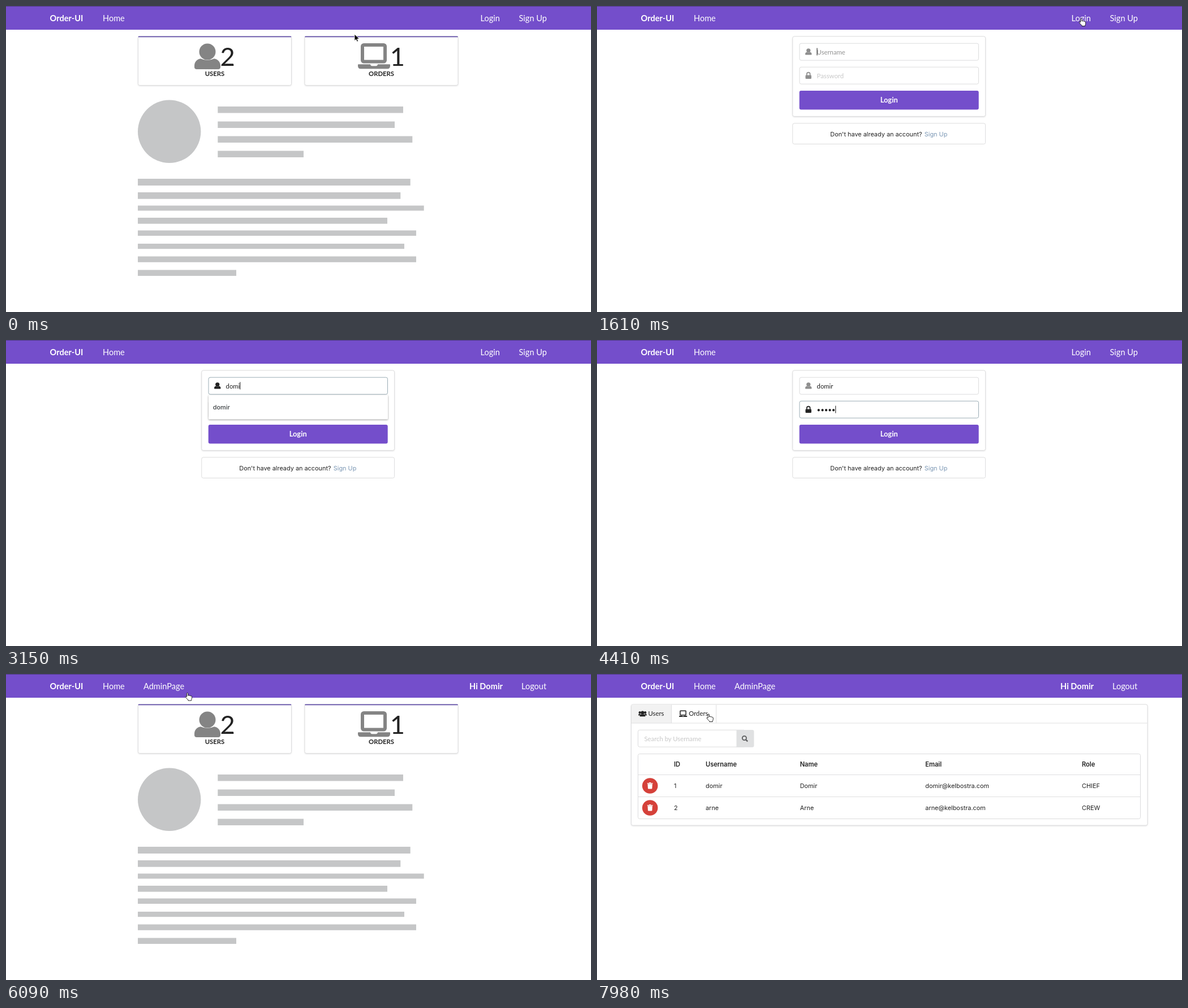
These frames come from a looping animation (1034x542 px, 8000 ms). An HTML page:

```html
<!DOCTYPE html>
<html lang="en">
<head>
<meta charset="utf-8">
<title>Order-UI</title>
<style>
html, body { margin: 0; width: 100%; height: 100%; overflow: hidden; background: #fff; }
svg { display: block; width: 1034px; height: 542px; }
text { font: 11.31px Lato, sans-serif; fill: #222; white-space: pre; }
.nav text { font-size: 14.56px; fill: #fff; }
.nav .bold, .bold { font-weight: 700; }
.sys, .sys text { font-family: Inter, sans-serif; font-size: 10.9px; }
.sys .head { font-weight: 600; font-size: 11.1px; }
.mid { text-anchor: middle; }
.num { font-size: 45.3px; text-anchor: middle; }
.box { fill: #fff; stroke: #dcdcdd; }
.line { stroke: #dfdfe0; }
.icon { fill: #848484; stroke: #848484; }
.dark { fill: #222; stroke: #222; }
.hint { fill: #c8c8c8; }
.card { filter: drop-shadow(0 1px 1px #2224261f); }
</style>
</head>
<body>
<svg viewBox="0 0 1034 542">
  <defs>
    <g id="person" stroke="none">
      <circle cx="23" cy="15" r="14.5"/>
      <path d="M0 42v-2C0 33 5 27.8 11 27.3q12 5.4 24 0c6 .5 11 5.7 11 12.7v2q0 4-4 4H4q-4 0-4-4z"/>
    </g>
    <g id="laptop">
      <rect x="8" y="3" width="40" height="29.5" rx="2.5" fill="none" stroke-width="6"/>
      <path stroke="none" d="M1 37.3H22q.5 3 3 3h7q2.500 0 3-3H56q1 0 1 1v2q0 5-5 5H5q-5 0-5-5v-2q0-1 1-1z"/>
    </g>
    <g id="lock">
      <rect y="5.400" width="10.400" height="6.600" rx="1.200" stroke="none"/>
      <path d="M2.300 6V3.600a2.900 2.900 0 0 1 5.800 0V6" fill="none" stroke-width="1.700"/>
    </g>
    <g id="bin">
      <circle r="13.800" fill="#d5413a"/>
      <path fill="#fff" d="M-4.800-5h3l.6-.9h2.400l.6.900h3v1.400h-9.600zM-4.200-2.900h8.400l-.5 7.300q-.1 1-1 1h-5.400q-.9 0-1-1z"/>
    </g>
    <g id="spinner" fill="none" stroke-width="2.400">
      <circle r="13" stroke="#e6e6e6"/>
      <circle class="arc" r="13" stroke="#767676" pathLength="4" stroke-dasharray="1 3"/>
    </g>
  </defs>

  <g class="nav">
    <rect width="1034" height="42" fill="#744ecb"/>
    <rect width="1034" height="1" fill="#4f3c86"/>
    <rect id="hover" y="1" height="41" fill="#fff"/>
    <text x="77.6" y="27.2" class="bold">Order-UI</text>
    <text x="171" y="27.2">Home</text>
    <g id="guest">
      <text x="838.500" y="27.2">Login</text>
      <text x="906.500" y="27.2">Sign Up</text>
    </g>
    <g id="member">
      <text x="243" y="27.2">AdminPage</text>
      <text x="878" y="27.2" class="bold" text-anchor="end">Hi Domir</text>
      <text x="911" y="27.2">Logout</text>
    </g>
  </g>

  <g id="home">
    <g class="card">
      <rect class="box" x="233.500" y="54" width="271" height="86.500" rx="3"/>
      <rect class="box" x="528" y="54" width="271" height="86.500" rx="3"/>
      <path d="M234.500 54.300h269M529 54.300h269" stroke="#6350a8" stroke-width="1.700" stroke-linecap="round"/>
    </g>
    <use href="#person" x="333" y="66" class="icon"/>
    <use href="#laptop" x="622" y="66" class="icon"/>
    <text id="people" x="391.700" y="106" class="num"></text>
    <text id="orders" x="692" y="106" class="num"></text>
    <text x="369" y="124.300" class="bold mid">USERS</text>
    <text x="663.500" y="124.300" class="bold mid">ORDERS</text>
    <g id="cardLoad">
      <rect x="-134" y="-41" width="268" height="82" fill="#fff" opacity=".8"/>
      <use href="#spinner" transform="scale(1.2)"/>
    </g>
    <g id="bars" fill="#c5c6c7"><circle cx="288.700" cy="222.300" r="55.700"/></g>
  </g>

  <g id="login">
    <g class="card"><rect class="box" x="345.800" y="53.900" width="340.800" height="141.700" rx="3"/></g>
    <g id="nameField">
      <rect class="box" x="358" y="66.200" width="316.500" height="30" rx="3"/>
      <use href="#person" transform="translate(368 75) scale(.25)" class="dark"/>
      <text x="388.600" y="85.700"></text>
      <path class="caret" d="M0 74.500v13" stroke="#111"/>
    </g>
    <g id="passField">
      <rect class="box" x="358" y="108.200" width="316.500" height="30" rx="3"/>
      <use href="#lock" x="368.500" y="117" class="dark"/>
      <text x="388.600" y="127.700"></text>
      <path class="caret" d="M0 116.500v13" stroke="#111"/>
    </g>
    <rect x="357.700" y="150" width="317" height="33.600" rx="3" fill="#744ecb"/>
    <text x="516.200" y="171.400" class="bold mid" style="font-size:12.9px;fill:#fff">Login</text>
    <rect class="box" x="345.800" y="207.800" width="340.800" height="36.700" rx="3"/>
    <g class="sys">
      <text x="412.300" y="230.600">Don't have already an account?</text>
      <text x="578.800" y="230.600" style="fill:#7b97b4">Sign Up</text>
    </g>
    <g id="suggest" class="sys">
      <rect x="358" y="97.500" width="317" height="43" rx="1.500" fill="#fff" style="filter:drop-shadow(0 1px 1.500px #0006)"/>
      <text x="365.800" y="122.800" style="font-weight:500;fill:#3c4043">domir</text>
    </g>
  </g>

  <g id="panel">
    <g class="card"><rect id="frame" class="box" x="60.500" y="53.900" width="912.500" rx="3"/></g>
    <path d="M61 87V57q0-2.600 2.600-2.600H131.500V87z" fill="#f2f2f2"/>
    <path class="line" d="M61 87H972.500M131.500 54.500V87M210.700 54.500V87"/>
    <g class="dark" stroke="none">
      <use href="#person" transform="translate(75.600 65.500) scale(.212)"/>
      <circle cx="75.700" cy="68.200" r="1.700"/>
      <circle cx="85.200" cy="68.200" r="1.700"/>
      <path stroke="none" d="M73.300 73.500v-1.600q0-1.400 1.400-1.400h2.200l-1.600 3zM87.700 73.500v-1.600q0-1.400-1.400-1.400h-2.200l1.600 3z"/>
    </g>
    <use href="#laptop" transform="translate(145 64.600) scale(.253)" class="dark"/>
    <text x="90.500" y="74.300">Users</text>
    <text x="162.300" y="74.300">Orders</text>
    <use id="panelLoad" href="#spinner" x="516.500" y="168.500"/>
    <g id="list">
      <rect class="box" x="72.500" y="99.200" width="190" height="30" rx="3"/>
      <path d="M246.500 99h28q3 0 3 3v24.700q0 3-3 3h-28z" fill="#e0e1e2"/>
      <g fill="none" stroke="#5c5d5e" stroke-width="1.800"><circle cx="260.400" cy="113.500" r="3.600"/><path d="M263 116.200l3.200 3.200" stroke-width="2.300"/></g>
      <text x="83.500" y="118.700" class="hint">Search by Username</text>
      <rect class="box" x="72.500" y="141.500" width="888" height="115" rx="3"/>
      <path class="line" d="M73 178.500H960M73 217.500H960"/>
      <use href="#bin" x="93.700" y="198"/>
      <use href="#bin" x="93.700" y="237"/>
      <g id="cells" class="sys"></g>
    </g>
  </g>

  <g id="cursor" stroke-linejoin="round">
    <path id="arrow" d="M0 0v11.500l2.700-2.400 1.800 4.100 2-.9-1.800-4 3.700-.2z" fill="#000" stroke="#fff" stroke-width=".8"/>
    <path id="hand" d="M0 1.300Q0 0 1.100 0t1.200 1.300V5q.4-1 1.500-.8.900.2 1 1 .3-.7 1.300-.5.900.2 1 1.100.4-.5 1.100-.3.900.3.900 1.300v2.600q0 1.500-1 2.900v1.300H2.500v-1.100Q.3 10.500-1.900 7.700q-.6-1 .2-1.500.800-.4 1.700.9z" fill="#fff" stroke="#111" stroke-width=".9"/>
  </g>
</svg>
<script>
const LOOP = 8000, $ = id => document.getElementById(id);
const clamp = v => Math.max(0, Math.min(1, v));
const fade = (t, from, span = 100) => clamp((t - from) / span);
const show = (id, on) => $(id).style.display = on ? '' : 'none';
const within = (t, a, b) => t >= a && t < b;

// Scene changes
const LOGIN = 1540, HOME = 5000, PEOPLE = 5150, ORDERS = 5310, PANEL = 6760, LIST = 6960;
// Key presses and focus changes
const FOCUS = 1600, NEXT = 3400, SUBMIT = 4480;
const nameKeys = [2590, 2730, 3010, 3150, 3290];
const passKeys = [3570, 3640, 3710, 3780, 4060];
// Pointer stops: time, x, y
const path = [[0, 616, 50], [840, 850, 24], [1000, 854.5, 22], [5460, 854.5, 22],
  [6080, 319.5, 33.5], [6400, 306, 26], [7150, 306, 26], [8000, 196, 71]];

const bars = [
  [374.3, 178, 11.5, 702], [374.3, 204.5, 11.5, 687], [374.3, 230.5, 11.5, 718.3], [374.3, 256.5, 11.5, 526],
  [233, 306, 12, 714.7], [233, 330, 11.7, 697.3], [233, 353.5, 9, 738.7], [233, 375, 10.7, 674],
  [233, 397.5, 9.5, 725], [233, 421, 9.2, 704], [233, 443.5, 10.3, 725], [233, 467.5, 10.5, 407]];
$('bars').innerHTML += bars.map(([x, y, h, end]) =>
  `<rect x="${x}" y="${y}" width="${end - x}" height="${h}"/>`).join('');

const columns = [136, 192, 358.7, 580.3, 857];
const rows = [
  ['ID', 'Username', 'Name', 'Email', 'Role'],
  ['1', 'domir', 'Domir', 'domir@kelbostra.com', 'CHIEF'],
  ['2', 'arne', 'Arne', 'arne@kelbostra.com', 'CREW']];
$('cells').innerHTML = rows.map((row, r) => row.map((cell, c) =>
  `<text x="${columns[c]}" y="${[164, 202, 241][r]}"${r ? '' : ' class="head"'}>${cell}</text>`).join('')).join('');

function drawField(id, t, value, hint, keys, start, end) {
  const [box, icon, text, caret] = $(id).children;
  const focused = within(t, start, end);
  const focus = focused ? fade(t, start + 10) : 0;
  const count = keys.filter(k => k <= t).length;
  const typed = value.slice(0, count);
  text.textContent = typed || hint;
  text.style.fill = typed ? '#222' : focused ? '#929292' : '#c8c8c8';
  icon.style.opacity = .5 + .5 * focus;
  box.style.stroke = `rgb(${220 - 65 * focus},${220 - 47 * focus},${221 - 40 * focus})`;
  const last = Math.max(start, ...keys.filter(k => k <= t));
  const x = 389 + (typed ? text.getComputedTextLength() : 0);
  caret.setAttribute('transform', `translate(${x})`);
  caret.style.display = focused && (t - last) % 1000 < 500 ? '' : 'none';
}

function pointer(t) {
  const i = path.findIndex(p => p[0] > t), a = path[i - 1], b = path[i];
  const u = (t - a[0]) / (b[0] - a[0]), e = u * u * (3 - 2 * u);
  return [a[1] + (b[1] - a[1]) * e, a[2] + (b[2] - a[2]) * e];
}

function drawPointer(t) {
  const [x, y] = pointer(t), member = t >= HOME;
  const items = member ? [[154, 332], [800, 972]] : [[154, 227], [822, 972]];
  const overNav = y < 42 && items.some(([a, b]) => within(x, a, b));
  const overTab = t >= PANEL && within(x, 61, 211) && within(y, 54, 87);
  show('cursor', t < nameKeys[0] || t >= 5460);
  show('hand', overNav || overTab);
  show('arrow', !overNav && !overTab);
  $('cursor').setAttribute('transform', `translate(${x} ${y})`);

  const hover = $('hover');
  hover.setAttribute('x', member ? 226.7 : 823);
  hover.setAttribute('width', member ? 105.3 : 67);
  const level = member ? (y < 42 || t < 7200 ? fade(t, 6090) : 0) : fade(t, 760) * (1 - fade(t, 1490));
  hover.style.opacity = .1 * level;
}

function draw(t) {
  const member = t >= HOME, panel = t >= PANEL, login = within(t, LOGIN, HOME);
  show('guest', !member);
  show('member', member);
  show('home', !login && !panel);
  show('login', login);
  show('panel', panel);

  $('people').textContent = within(t, HOME, PEOPLE) ? 0 : 2;
  $('orders').textContent = within(t, HOME, ORDERS) ? 0 : 1;
  show('cardLoad', within(t, HOME, ORDERS));
  $('cardLoad').setAttribute('transform', `translate(${t < PEOPLE ? 369 : 663.5} 97.7)`);

  if (login) {
    drawField('nameField', t, 'domir', 'Username', nameKeys, FOCUS, NEXT);
    drawField('passField', t, '•••••', 'Password', passKeys, NEXT, SUBMIT);
    show('suggest', within(t, nameKeys[0], 3360));
  }

  $('frame').setAttribute('height', t < LIST ? 235.6 : 214.2);
  show('panelLoad', t < LIST);
  show('list', t >= LIST);

  const began = panel ? PANEL + 25 : HOME + 15;
  document.querySelector('.arc').setAttribute('transform', `rotate(${(t - began) * .6 - 135})`);
  drawPointer(t);
}

const started = performance.now();
function tick() {
  draw((performance.now() - started) % LOOP);
  requestAnimationFrame(tick);
}
tick();
</script>
</body>
</html>
```
